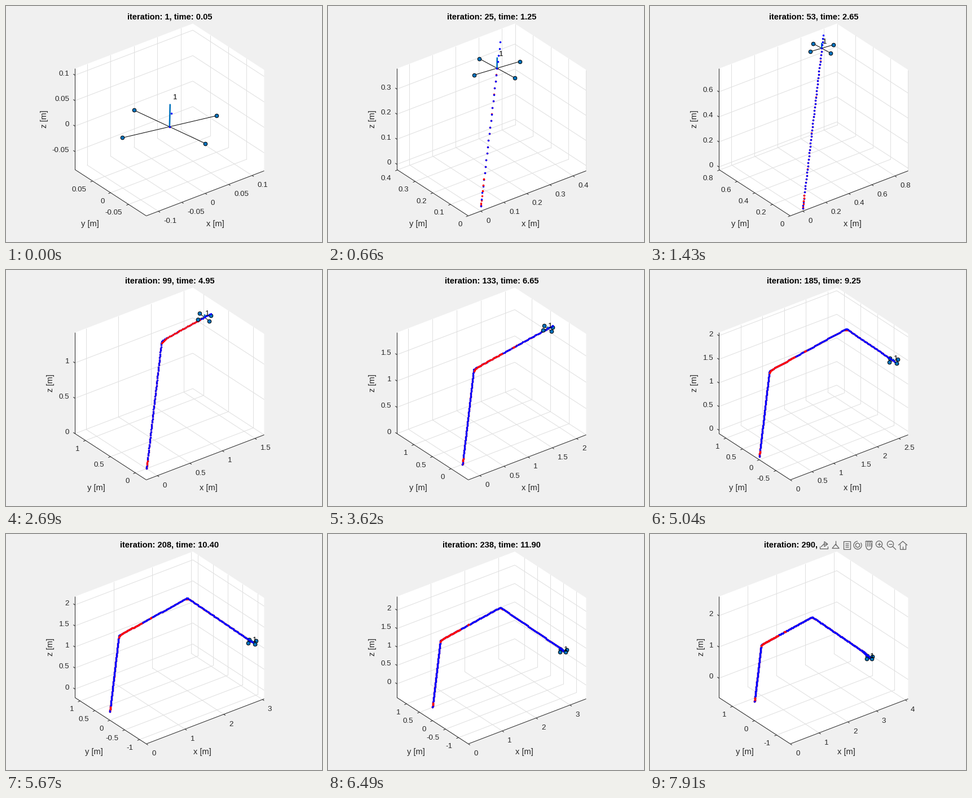
A matplotlib script for the animation above (8010 ms loop, 560 by 420 pixels).

```python
import numpy as np
import matplotlib.pyplot as plt
from matplotlib.animation import FuncAnimation
from matplotlib.collections import LineCollection
from matplotlib.patches import Polygon, Rectangle

plt.rcParams["font.family"] = "Liberation Sans"

W, H, DPI = 560, 420, 100
PT = 72 / DPI  # points per pixel
BG, INK, BLUE, GREY = "#f0f0f0", "#262626", "#0072bd", "#666666"
TICK_MS, LOOP_MS = 30, 8010

# ---- schedule: a picture spans four iterations, later every fourth one only three
SHOTS, STEADY = 77, 17
shot_no = np.arange(SHOTS - 1)
SKIP = np.where((shot_no > STEADY) & ((shot_no - STEADY) % 4 == 1), 3, 4)
STARTS = np.append(0, np.cumsum(30 * SKIP - 10))
ITERS = np.append(1, 1 + np.cumsum(SKIP))
N = ITERS[-1]

# ---- flight: constant speed between waypoints, followed by a damped tracker
DT, SPEED, G = 0.05, 0.5, 9.81
OMEGA, ZETA = 10.0, 0.875
ARM, MAST = 0.1, 0.041
LEG = np.sqrt(3) / SPEED


def goal(t):
    """Unit steps in x, y swinging between 1 and -1, z rising to 2 and back."""
    s = np.clip(np.asarray(t) / LEG, 0, 4)
    y = 1 - abs((s - 1) % 4 - 2)
    return np.stack([s, -y, 2 - abs(s - 2)], -1)


def fly(n, sub=25):
    pos, vel = np.zeros(3), np.zeros(3)
    path, force = [], []
    for k in range(1, n + 1):
        target = goal(k * DT)
        path.append(pos)
        force.append(OMEGA**2 * (target - pos) - 2 * ZETA * OMEGA * vel + [0, 0, G])
        for _ in range(sub):
            acc = OMEGA**2 * (target - pos) - 2 * ZETA * OMEGA * vel
            vel = vel + acc * DT / sub
            pos = pos + vel * DT / sub
    return np.array(path), np.array(force)


PATH, FORCE = fly(N)
GOAL = goal(DT * np.arange(N + 1))
T = DT * np.arange(1, N + 1)
SINCE = T - LEG
# stretches where the flown path lies nearer the viewer
NEAR = (abs(T - 0.36) < 0.07) | (abs(SINCE - 0.73) < 0.63) | (abs(SINCE - 1.8) < 0.04)

# ---- orthographic view, azimuth -37.5, elevation 30
CA, SA = np.cos(np.radians(37.5)), np.sin(np.radians(37.5))
SE, CE = 0.5, np.sqrt(0.75)
K, X0, Y0 = 207.6, 248.6, 373.5
BOX = np.array([1.268, 1, 1])


def project(q):
    x, y, z = np.moveaxis(np.asarray(q, float), -1, 0)
    return np.stack([X0 + K * (CA * x - SA * y),
                     Y0 - K * (SE * (SA * x + CA * y) + CE * z)], -1)


fig = plt.figure(figsize=(W / DPI, H / DPI), dpi=DPI, facecolor=BG)
ax = fig.add_axes([0, 0, 1, 1])
ax.set_xlim(0, W)
ax.set_ylim(H, 0)
ax.axis("off")

bx, by, bz = BOX
HULL = project([[0, 0, 0], [bx, 0, 0], [bx, 0, bz], [bx, by, bz], [0, by, bz], [0, by, 0]])
ax.add_patch(Polygon(HULL, fc="white", ec="none", zorder=0))

live = []


def segs(pts, color, width, z):
    live.append(ax.add_collection(
        LineCollection(pts, colors=color, linewidths=width * PT, zorder=z)))


def dots(pts, color, z, size=3.5, rim=0):
    live.extend(ax.plot(pts[:, 0], pts[:, 1], "o", ms=size * PT, mfc=color, mec="black",
                        mew=rim * PT, zorder=z, snap=False))


def word(x, y, s, px=13.33, ha="center", color=INK, z=4, **kw):
    """Text whose digits are centred on y."""
    live.append(ax.text(x, y + 0.35 * px, s, fontsize=px * PT, ha=ha, va="baseline",
                        color=color, zorder=z, **kw))


def text_width(s):
    return 7.4 * len(s) - 3.3 * (s.count("-") + s.count("."))


def ticks(lo, hi):
    span = hi - lo
    power = 10.0 ** np.floor(np.log10(span / 5.7))
    step = power * next(m for m in (1, 2, 5, 10) if span <= 5.7 * m * power)
    eps = 1e-6 * span
    k = np.arange(np.ceil((lo - eps) / step), np.floor((hi + eps) / step) + 1)
    return [round(v, 6) + 0.0 for v in k * step]


def draw_axes(lo, scale):
    hi = lo + BOX * scale
    out = 5 / K
    widest = [0, 0, 0]
    for axis in range(3):
        for v in ticks(lo[axis], hi[axis]):
            u = (v - lo[axis]) / scale
            if axis == 0:
                wire = [[u, 0, 0], [u, by, 0], [u, by, bz]]
                stub, shift, ha = [0, -out, 0], (9.5, 16), "left"
            elif axis == 1:
                wire = [[0, u, 0], [bx, u, 0], [bx, u, bz]]
                stub, shift, ha = [-out, 0, 0], (-11, 13.6), "right"
            else:
                wire = [[0, by, u], [bx, by, u], [bx, 0, u]]
                stub, shift, ha = [0, out, 0], (-10, -4), "right"
            a, b, c = project(wire)
            segs([[a, b], [b, c]], "#dfdfdf", 1, 1)
            segs([[a, project(np.add(wire[0], stub))]], INK, 1, 2)
            s = f"{v:g}"
            widest[axis] = max(widest[axis], text_width(s))
            word(*(a + shift), s, ha=ha)
    edge = project([[bx, 0, 0], [0, 0, 0], [0, by, 0], [0, by, bz]])
    segs(list(zip(edge, edge[1:])), INK, 1, 2)
    wx, wy, wz = widest
    word(340 + wx, 386.5, "x [m]", 14.67)
    word(179 - wy, 386.5, "y [m]", 14.67)
    live.append(ax.text(98 - wz, 201, "z [m]", fontsize=14.67 * PT, color=INK,
                        rotation=90, ha="center", va="center", zorder=4))


def body_axes(f):
    b3 = f / np.linalg.norm(f)
    b1 = np.array([1, 0, 0]) - b3[0] * b3
    b1 /= np.linalg.norm(b1)
    return b1, np.cross(b3, b1), b3


def draw_toolbar():
    live.append(ax.add_patch(Rectangle((298.5, 10), 160, 19.5, fc=BG, ec="none", zorder=20)))

    def stroke(*pts):
        segs([pts], GREY, 1.3, 21)

    def ngon(x, y, rx, ry, n=32, turn=-90, sweep=360):
        a = np.radians(turn + np.linspace(0, sweep, n + 1))
        segs([np.c_[x + rx * np.cos(a), y + ry * np.sin(a)]], GREY, 1.3, 21)

    # export
    stroke((301, 22), (301, 26), (315, 26), (315, 22))
    stroke((303, 23), (308, 18), (314, 18))
    ngon(311, 18, 4, 5, 3, 0)
    # brush
    stroke((329, 12), (329, 20))
    ngon(329, 23, 7, 5, 3)
    # data tip
    ngon(349, 20, 9, 10, 4, 45)
    for y in (17, 20, 23):
        stroke((346, y), (352, y))
    # rotate
    ngon(368, 20, 7, 7, turn=-40, sweep=310)
    ngon(368, 20, 4, 4, 6)
    # pan
    ngon(388, 22, 5, 6, turn=0, sweep=180)
    for x in (383, 386, 389, 392):
        ngon(x + 0.5, 15, 1.5, 2.5, turn=180, sweep=180)
        stroke((x - 1, 15), (x - 1, 22))
    stroke((393, 15), (393, 22))
    # zoom in and out
    for x in (406, 426):
        ngon(x, 18, 5.6, 5.6)
        stroke((x + 4, 22), (x + 10, 28))
        stroke((x - 3, 18), (x + 3, 18))
    stroke((406, 15), (406, 21))
    # home
    stroke((440, 20), (448, 13), (456, 20))
    stroke((443, 18), (443, 27), (453, 27), (453, 18))
    stroke((448, 22), (448, 27))


def update(i):
    while live:
        live.pop().remove()
    n = ITERS[np.searchsorted(STARTS, i * TICK_MS + 20, side="right") - 1]
    here = PATH[n - 1]
    b1, b2, b3 = body_axes(FORCE[n - 1])
    rotors = here + ARM * np.array([b1, b2, -b1, -b2])
    tip = here + MAST * b3

    # equal scale limits, centred on everything drawn
    data = np.vstack([GOAL[:n + 1], PATH[:n], rotors, tip])
    low, high = data.min(0), data.max(0)
    scale = ((high - low) / BOX).max()
    lo = (low + high - BOX * scale) / 2

    def view(p):
        return project((p - lo) / scale)

    draw_axes(lo, scale)

    flown = view(PATH[:n])
    dots(flown, "red", 6)
    dots(view(GOAL[:n + 1]), "blue", 8)
    dots(flown[NEAR[:n]], "red", 9)

    r, c, top = view(rotors), view(here), view(tip)
    segs([r[[0, 2]], r[[1, 3]]], "black", 1, 7)
    segs([[c, top]], BLUE, 2.6, 7)
    dots(r[:2], BLUE, 7.5, 6.6, 1)
    dots(r[2:], BLUE, 10, 6.6, 1)
    px = K / scale
    word(c[0] + 0.5 + 0.005 * px, c[1] - 0.051 * px, "1", ha="left", color="black", z=11)

    word(290, 18.6, f"iteration: {n}, time: {n * DT:.2f}", 14.67, color="black",
         weight="bold")
    if n == N:
        draw_toolbar()
    return live


anim = FuncAnimation(fig, update, frames=LOOP_MS // TICK_MS, interval=TICK_MS,
                     init_func=lambda: [], repeat=True, repeat_delay=0, blit=False)
plt.show()
```
